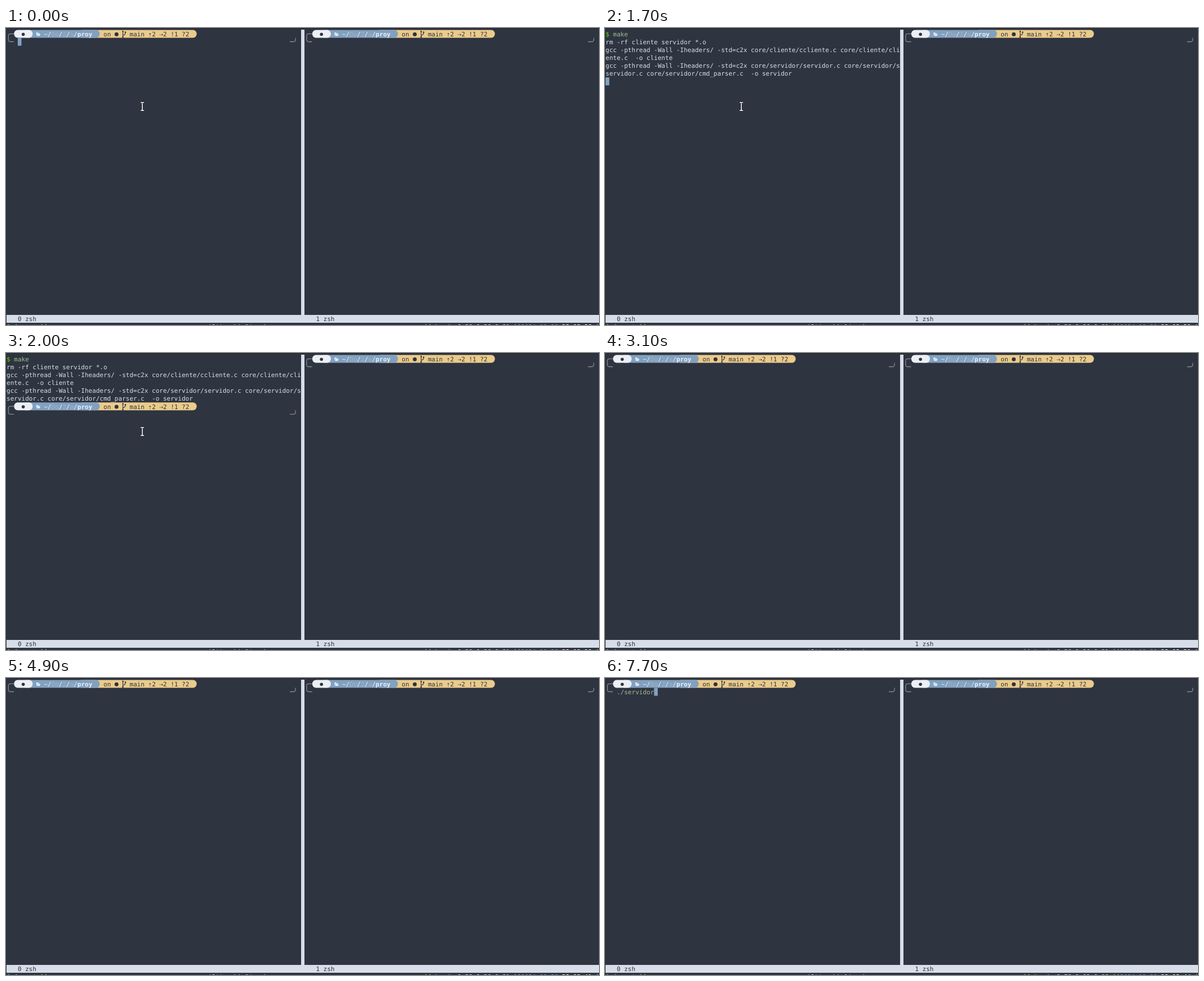
These frames come from a looping animation (1057 by 530 pixels, 8 s). An HTML page:

```html
<!DOCTYPE html>
<html lang="es">
<head>
<meta charset="utf-8">
<title>Terminal</title>
<style>
html, body { margin: 0; width: 100%; height: 100%; overflow: hidden; background: #2e3440; }
svg { display: block; width: 1057px; height: 530px; }
text { font: 11.04px "DejaVu Sans Mono", monospace; white-space: pre; text-rendering: geometricPrecision; }
.bold { font-weight: bold; }
</style>
</head>
<body>
<svg id="stage" viewBox="0 0 1057 530" xmlns="http://www.w3.org/2000/svg">
  <defs>
    <linearGradient id="wall" x1="0" y1="0" x2="0" y2="1">
      <stop offset="0" stop-color="#686163"/><stop offset=".6" stop-color="#645956"/><stop offset="1" stop-color="#52433c"/>
    </linearGradient>
    <linearGradient id="shade" x1="0" y1="0" x2="0" y2="1">
      <stop offset="0" stop-color="#4c464e"/><stop offset=".6" stop-color="#474047"/><stop offset=".75" stop-color="#3d3230"/><stop offset="1" stop-color="#43352f"/>
    </linearGradient>
    <linearGradient id="glow" x1="0" y1="0" x2="1" y2="0">
      <stop offset="0" stop-color="#54494a"/><stop offset=".5" stop-color="#72665f"/><stop offset="1" stop-color="#7b6e65"/>
    </linearGradient>
    <linearGradient id="metal" x1="0" y1="0" x2="1" y2="0">
      <stop offset="0" stop-color="#69737a"/><stop offset=".7" stop-color="#515a61"/><stop offset="1" stop-color="#383c40"/>
    </linearGradient>
    <linearGradient id="wood" x1="0" y1="0" x2="1" y2="0">
      <stop offset="0" stop-color="#4b2d22"/><stop offset=".5" stop-color="#7e4f35"/><stop offset="1" stop-color="#5f3c2a"/>
    </linearGradient>
    <clipPath id="disc"><ellipse cx="151" cy="124" rx="73" ry="76"/></clipPath>
    <clipPath id="strip"><rect width="1057" height="166"/></clipPath>
  </defs>
  <rect width="1057" height="530" fill="#2e3440"/>
  <path d="M0 0H1057V2H1V530H0Z" fill="#292e39"/>
  <g id="left"></g>
  <g id="right"></g>
  <g id="photo" clip-path="url(#strip)"></g>
  <g id="frame"></g>
  <g id="bar"></g>
  <g id="pointer" fill="none">
    <path id="beam" d="M240 133H242.2L243 133.8L243.8 133H246M243 133.8V146.4M240 147.2H242.2L243 146.4L243.8 147.2H246" stroke="#1d2028" stroke-width="3"/>
    <use href="#beam"/>
    <path d="M240 133H242.2L243 133.8L243.8 133H246M243 133.8V146.4M240 147.2H242.2L243 146.4L243.8 147.2H246" stroke="#fff" stroke-width="1.6"/>
  </g>
</svg>
<script>
const NS = "http://www.w3.org/2000/svg";
const LOOP = 8000, CELL = 6.645, ROW = 14.13, PANE = 80 * CELL;
const DARK = "#2e3440", LIGHT = "#d8dee9", WHITE = "#eceff4", BLUE = "#81a1c1",
      YELLOW = "#ebcb8b", GREEN = "#a3be8c", RED = "#bf616a", DIM = "#a8b1b6";

const byId = id => document.getElementById(id);
const colX = c => 1 + c * CELL;
const rowY = r => 3.4 + r * ROW;

function add(parent, tag, attrs, content) {
  const el = document.createElementNS(NS, tag);
  for (const key in attrs) el.setAttribute(key, attrs[key]);
  if (content !== undefined) el.textContent = content;
  parent.appendChild(el);
  return el;
}
const path = (parent, d, fill, stroke = "none", width = 1) =>
  add(parent, "path", { d, fill, stroke, "stroke-width": width });
const rect = (parent, x, y, width, height, fill) =>
  add(parent, "rect", { x, y, width, height, fill });
const ellipse = (parent, cx, cy, rx, ry, fill) =>
  add(parent, "ellipse", { cx, cy, rx, ry, fill });
const write = (parent, col, row, str, fill = LIGHT, cls = "") =>
  add(parent, "text", { x: colX(col), y: Math.round(14.8 + row * ROW), fill, class: cls }, str);

// Row-high block with a round right end and an optional round left end.
function segment(parent, from, to, fill, roundLeft) {
  const r = ROW / 2, a = colX(from), b = colX(to);
  const start = roundLeft ? `M${a + CELL} ${ROW}A${CELL} ${r} 0 0 1 ${a + CELL} 0` : `M${a} ${ROW}V0`;
  path(parent, `${start}H${b - CELL}A${CELL} ${r} 0 0 1 ${b - CELL} ${ROW}Z`, fill);
}

function makePrompt(parent) {
  const g = add(parent, "g", {});
  const blocks = add(g, "g", { transform: `translate(0 ${rowY(0)})` });
  segment(blocks, 20, 51, YELLOW);
  segment(blocks, 5, 25, BLUE);
  segment(blocks, 2, 7, WHITE, true);
  path(g, "M14 10.4H8Q4.3 10.4 4.3 14V21Q4.3 24.5 8 24.5H14M506 24.5H512Q516 24.5 516 21V17.5", "none", "#868a91", 1.3);
  add(g, "circle", { cx: 30.7, cy: 11.2, r: 2.8, fill: DARK });
  path(g, "M54 8h2.6l1 1.2h2.5v1.2h-4.3l-1.8 3.4zM56.2 11h5.2l-1.5 3h-5.2z", WHITE);
  [[10, "~/", WHITE], [12, "Do", DIM], [14, "/", WHITE], [15, "2", DIM], [16, "/", WHITE],
   [17, "a", DIM], [18, "/", WHITE]].forEach(([c, s, color]) => write(g, c, 0, s, color));
  write(g, 19, 0, "proy", WHITE, "bold");
  [[26, "on"], [33, "main"], [38, "⇡2"], [41, "⇢2"], [44, "!1"], [47, "?2"]]
    .forEach(([c, s]) => write(g, c, 0, s, DARK));
  add(g, "circle", { cx: 197, cy: 11.2, r: 3.5, fill: DARK });
  path(g, "M208.4 6V16.5M208.4 13Q212.6 12.4 212.8 8.5", "none", DARK, 1.2);
  [[208.4, 6], [208.4, 16.3], [212.8, 7.6]].forEach(([cx, cy]) =>
    add(g, "circle", { cx, cy, r: 1.3, fill: DARK }));
  return g;
}

const left = byId("left"), right = byId("right"), frame = byId("frame");
right.setAttribute("transform", `translate(${PANE} 0)`);
makePrompt(right);
const prompt = makePrompt(left);

const log = [
  "",
  "rm -rf cliente servidor *.o",
  "gcc -pthread -Wall -Iheaders/ -std=c2x core/cliente/ccliente.c core/cliente/cli",
  "ente.c  -o cliente",
  "gcc -pthread -Wall -Iheaders/ -std=c2x core/servidor/servidor.c core/servidor/s",
  "servidor.c core/servidor/cmd_parser.c  -o servidor"
].map((line, row) => {
  const g = add(left, "g", {});
  if (row) write(g, 0, row, line);
  else {
    write(g, 0, 0, "$", "#5fd700");
    write(g, 2, 0, "make", GREEN);
  }
  return g;
});
const typed = write(left, 3, 1, "");
const underline = rect(left, colX(3), 30, 0, 1, WHITE);
const cursor = rect(left, 0, 0, CELL, ROW, BLUE);

// Split line and window captions
const split = rect(frame, 526, 3, 6, 510, LIGHT);
rect(frame, 1, 512, 1056, 14, LIGHT);
write(frame, 3, 36, "0 zsh", DARK);
write(frame, 83, 36, "1 zsh", DARK);

// Status line, mostly below the lower edge
const bar = byId("bar");
const status = (col, str, fill, cls = "") =>
  add(bar, "text", { x: colX(col), y: 537, fill, class: cls }, str);
status(0, "[", GREEN);
status(2, "forest", BLUE);
status(9, "][", GREEN);
status(54, "(0*$ zsh) 1$ zsh", LIGHT);
status(112, "][", GREEN);
const load = status(115, "", LIGHT);
status(136, "][", GREEN);
status(138, "2024-10-30", BLUE);
const clock = status(149, "", WHITE, "bold");
status(158, "]", GREEN);

function drawPhoto(g) {
  rect(g, 0, 0, 1057, 166, "url(#wall)");
  path(g, "M640 0H735L747 30V150L668 128Z", "url(#glow)");
  path(g, "M640 0H745V10Q700 40 668 42Z", "#585052");
  path(g, "M745 0H986V166H747V36L733 32Q745 24 745 0Z", "url(#shade)");
  path(g, "M240 166Q330 140 500 138L668 128L747 150V166Z", "#4e4039");
  path(g, "M0 132Q22 134 40 145M228 148Q290 136 345 150", "none", "#80756e", 1.5);

  // Round painting
  ellipse(g, 158, 123, 80, 77, "#251d1e");
  ellipse(g, 151, 124, 76, 78, "#171519");
  const art = add(g, "g", { "clip-path": "url(#disc)" });
  rect(art, 70, 45, 170, 125, "#2b1e20");
  for (let row = 0; row < 7; row++) {
    const y = 78 + row * 15;
    for (let i = 0; i < 7; i++)
      ellipse(art, 84 + i * 13 + row % 2 * 5, y - 2, 7, 4, i % 2 ? "#a37b70" : "#8f685e");
    rect(art, 76, y, 86, 5, "#70443a");
  }
  for (let i = 0; i < 8; i++) {
    const y = 82 + i * 19;
    path(art, `M168 ${y}Q192 ${y - 8} 230 ${y - 42}`, "none", i % 2 ? "#8c6156" : "#a1776a", 10);
  }
  path(art, "M76 45H222V68L169 72H76Z", "#221c20");
  path(art, "M162 46L169 46L166 170H160Z", "#5a3630");

  // Framed map
  path(g, "M348 55L666 40V128L353 137Z", "#18171b");
  path(g, "M357 65L657 49V120L361 129Z", "#aaa29c");
  path(g, "M359 70L655 55V114L362 122Z", "#97705e");
  path(g, "M385 116Q392 98 430 104L520 103L600 108L640 102V114L385 121Z", "#857870");
  path(g, "M628 57L655 55V112Q642 108 640 88T628 57Z", "#7c8487");
  path(g, "M365 92Q430 76 480 85T570 80T635 98", "none", "#7a5c4e", 4);
  path(g, "M369 70L400 68V76L369 78Z", "#b9aea3");
  ellipse(g, 573, 89, 6, 5, "#858e90");
  [412, 438, 463, 505, 530, 557].forEach((x, i) =>
    rect(g, x, 107 - i * 0.7, 22, 9, i % 3 ? "#575150" : "#766b64"));
  ellipse(g, 447, 62, 24, 4, "#f0eeec");
  ellipse(g, 617, 54, 25, 2.5, "#c9c1ba");
  path(g, "M452 65Q457 76 448 87M620 55L622 61", "none", "#ded5cb", 2);

  // Barrel and its shadow
  path(g, "M992 166Q996 112 1000 90Q1020 80 1043 90L1046 166Z", "#3b3337");
  path(g, "M1006 166Q1007 130 1015 108Q1035 102 1057 108V166Z", "url(#wood)");
  path(g, "M1013 110Q1035 103 1057 110V117Q1034 112 1011 117Z", "#84614b");
  path(g, "M1008 132Q1032 127 1057 132V137Q1032 133 1007 137Z", "#957657");
  ellipse(g, 438, 162, 4, 7, "#302523");
  ellipse(g, 518, 162, 6, 7, "#302523");

  // Lamps and cables
  path(g, "M30 0H153L155 16L28 24Z", "url(#metal)");
  path(g, "M245 0H345V2Q300 9 245 3Z", "#35302f");
  path(g, "M257 0Q263 62 288 66Q304 66 308 10", "none", "#3b3433", 2.5);
  ellipse(g, 308, 10, 6, 5, "#282324");
  path(g, "M51 28Q62 78 101 79Q130 78 131 20", "none", "#f4efe9", 3);
  ellipse(g, 131, 21, 5, 4, "#ffffff");
  ellipse(g, 53, 28, 4, 3, "#d5d7d8");
  path(g, "M151 17L152 27", "none", "#ddd", 2);
  path(g, "M482 0Q486 54 495 60Q500 54 501 3", "none", "#eee4d7", 2.5);
  ellipse(g, 502, 3, 7, 5, "#ffffff");
  path(g, "M714 0Q714 38 710 54", "none", "#e6d5c2", 3.5);
  path(g, "M965 3Q987 45 997 45Q1010 42 1008 0", "none", "#4b3930", 2);
  path(g, "M963 2Q984 45 998 45", "none", "#f3e3cf", 3);
  ellipse(g, 963, 1, 7, 4, "#ffffff");
}
const photo = byId("photo");
drawPhoto(photo);

// Each cue: time, log lines, prompt row (-1 for none), typed text, cursor on
const cues = [
  [0, 0, 0, "", 1], [100, 0, 0, "", 0],
  [500, 0, 0, "m", 1], [900, 0, 0, "ma", 1], [1100, 0, 0, "mak", 1], [1300, 0, 0, "make", 1],
  [1500, 1, -1, "", 1], [1600, 4, -1, "", 1], [1700, 6, -1, "", 1],
  [1900, 0, -1, "", 0], [2000, 6, 6, "", 0], [2600, 6, 6, "", 1],
  [3000, 0, -1, "", 1], [3100, 0, 0, "", 0], [3200, 0, 0, "", 1],
  [3900, 0, 0, "", 0], [4400, 0, 0, "", 1], [4900, 0, 0, "", 0],
  [5400, 0, 0, ".", 1], [5500, 0, 0, "./", 1], [5900, 0, 0, "./s", 1],
  [6200, 0, 0, "./servidor", 1], [7300, 0, 0, "./servidor", 0], [7400, 0, 0, "./servidor", 1]
];
const ticks = [700, 1700, 2600, 3700, 4600, 5700, 6700, 7700];
const show = (el, on) => el.setAttribute("display", on ? "inline" : "none");

function update(t) {
  const [, lines, row, input, lit] = cues.filter(c => c[0] <= t).pop();
  const inPhoto = t >= 1900 && t < 2000;
  const isPath = input[0] === ".";
  const known = input === "make" || input === "./servidor";

  log.forEach((line, i) => show(line, i < lines));
  show(prompt, row >= 0);
  prompt.setAttribute("transform", `translate(0 ${Math.max(row, 0) * ROW})`);

  typed.textContent = input;
  typed.setAttribute("fill", known ? GREEN : isPath ? WHITE : RED);
  underline.setAttribute("width", isPath && !known ? input.length * CELL : 0);

  show(cursor, lit);
  cursor.setAttribute("x", colX(row < 0 ? 0 : 3 + input.length));
  cursor.setAttribute("y", rowY(row < 0 ? lines : row + 1));

  show(photo, inPhoto);
  show(right, !inPhoto);
  split.setAttribute("y", inPhoto ? 166 : 3);
  split.setAttribute("height", inPhoto ? 347 : 510);
  show(byId("pointer"), t < 3000);

  clock.textContent = "23:03:" + (36 + ticks.filter(x => x <= t).length);
  load.textContent = "Load: " + (t < 6700 ? "0.58 0.56 0.81" : "0.78 0.62 0.80");
}

const start = performance.now();
function loop() {
  update((performance.now() - start) % LOOP);
  requestAnimationFrame(loop);
}
loop();
</script>
</body>
</html>
```
